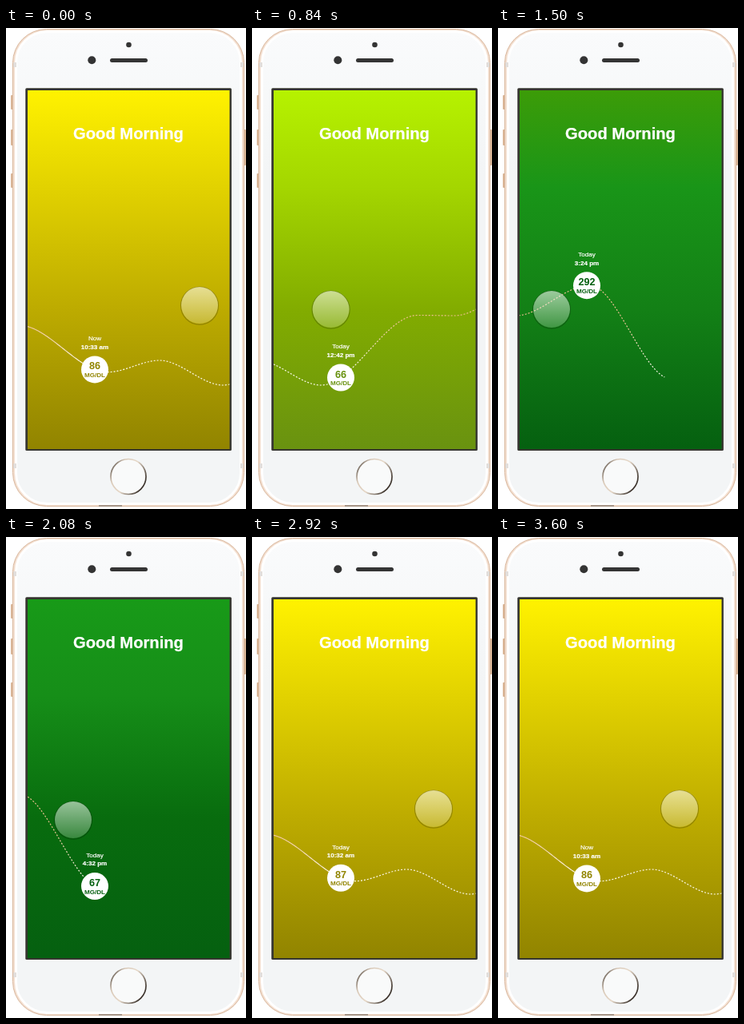
Animation, 300 px wide and 602 px high, one loop 3620 ms. Source, as an HTML page:

```html
<!DOCTYPE html>
<html lang="en">
<head>
<meta charset="utf-8">
<title>Glucose timeline</title>
<style>
  html, body { margin: 0; width: 100%; height: 100%; overflow: hidden; background: #fff; }
  svg { display: block; width: 300px; height: 602px; }
  text { font-family: "Liberation Sans", Arial, sans-serif; text-anchor: middle; }
  .bold { font-weight: bold; }
  .label { font-size: 8.1px; fill: #fff; stroke: #fff; stroke-width: .2; }
  .line { fill: none; stroke: url(#stroke); stroke-width: 1.15; }
</style>
</head>
<body>
<svg viewBox="0 0 300 602">
  <defs>
    <linearGradient id="sky" x1="0" y1="0" x2="0" y2="1">
      <stop offset="0"/><stop offset=".27"/><stop offset=".61"/><stop offset="1"/>
    </linearGradient>
    <linearGradient id="stroke" gradientUnits="userSpaceOnUse" x1="0" y1="365" x2="0" y2="428">
      <stop offset="0" stop-color="#efc090"/><stop offset="1" stop-color="#fffdf2"/>
    </linearGradient>
    <linearGradient id="glass" x1="0" y1="0" x2="0" y2="1">
      <stop offset="0" stop-color="#fff" stop-opacity=".58"/>
      <stop offset="1" stop-color="#fff" stop-opacity=".2"/>
    </linearGradient>
    <linearGradient id="face" x1="0" y1="0" x2="0" y2="1">
      <stop offset="0" stop-color="#fafbfc"/><stop offset=".3" stop-color="#f3f5f6"/>
    </linearGradient>
    <linearGradient id="ring" x1="0" y1="0" x2="1" y2=".6">
      <stop offset="0" stop-color="#2c2622"/><stop offset=".3" stop-color="#d9c9b8"/>
      <stop offset=".6" stop-color="#e6d8c8"/><stop offset="1" stop-color="#3c332c"/>
    </linearGradient>
    <clipPath id="screen"><rect x="27" y="78" width="252.5" height="449"/></clipPath>
  </defs>

  <g fill="#d9b596">
    <rect x="6" y="84" width="3" height="18" rx="1"/>
    <rect x="6" y="127" width="3" height="20" rx="1"/>
    <rect x="6" y="182" width="3" height="18" rx="1"/>
    <rect x="297" y="127" width="3" height="45" rx="1"/>
  </g>
  <rect x="8.5" y="1.5" width="289" height="597" rx="42" fill="#f3dfd0" stroke="#d9b79d"/>
  <rect x="12.5" y="4.5" width="281" height="591" rx="39" fill="url(#face)" stroke="#fff" stroke-width="3"/>
  <path d="M9 46h4M9 548h4M293 46h4M293 548h4" stroke="#e2dedb" stroke-width="6"/>
  <path d="M116 598h29" stroke="#8f8074" stroke-width="1.5"/>
  <g fill="#343434">
    <circle cx="153.5" cy="21" r="3.3"/>
    <circle cx="107.3" cy="40.3" r="5"/>
    <rect x="130" y="38" width="47" height="5" rx="2.5"/>
  </g>
  <circle cx="153" cy="561.5" r="22" fill="#f9fafa" stroke="url(#ring)" stroke-width="1.7"/>
  <rect x="24.3" y="75.2" width="257.6" height="453.8" rx="1.5" fill="#35352f"/>
  <rect x="27" y="78" width="252.5" height="449" fill="url(#sky)"/>

  <text class="bold" x="153" y="139.2" font-size="20.2" fill="#fff" stroke="#fff" stroke-width=".25">Good Morning</text>

  <g clip-path="url(#screen)">
    <g id="track">
      <path class="line" id="past"/>
      <path class="line" id="future" stroke-dasharray="2 2"/>
    </g>
  </g>
  <g id="marker">
    <text class="label" id="day" y="-36.3"></text>
    <text class="label bold" id="clock" y="-25.6"></text>
    <circle r="17" fill="#fff"/>
    <g id="reading" class="bold">
      <text id="value" font-size="12.6"></text>
      <text y="9.6" font-size="8.1">MG/DL</text>
    </g>
  </g>
  <g id="finger">
    <circle cy=".6" r="23.5" fill="none" stroke="#000" stroke-opacity=".22" stroke-width="1.2"/>
    <circle r="23" fill="url(#glass)"/>
  </g>
</svg>
<script>
const LOOP = 3620, NOW_X = 111, END_X = 624, SPAN = END_X - NOW_X;
const PRESS = 100, RELEASE = 840;
const $ = id => document.getElementById(id);

const clamp = (v, lo, hi) => Math.min(hi, Math.max(lo, v));
const progress = (t, a, b) => clamp((t - a) / (b - a), 0, 1);
const ease = (t, a, b) => {
  const u = progress(t, a, b);
  return u * u * (3 - 2 * u);
};

// Accelerates while dragged over `pull`, then coasts to `rest` without a jump in speed.
function fling(t, pull, rest) {
  if (t < RELEASE) return pull * progress(t, PRESS, RELEASE) ** 2;
  const speed = 2 * pull / (RELEASE - PRESS), left = rest - pull;
  return rest - left * Math.exp(-speed * (t - RELEASE) / left);
}

function scroll(t) {
  const overshoot = 1.4 * Math.sin(Math.PI * progress(t, 2840, 3000));
  return Math.min(SPAN, fling(t, 184.5, 620)) - SPAN * ease(t, 2130, 2838) - overshoot;
}

function finger(t) {
  const back = ease(t, 2110, 2540);
  const x = 242 - fling(t, 143, 175) + 17 * ease(t, 1500, 2080)
    + 214 * back - 71 * ease(t, 2540, 2900);
  return [x, 347 + 5 * ease(t, PRESS, RELEASE) + 2 * ease(t, 1500, 2080) - 14 * back];
}

// Turning points of the glucose curve.
const turns = [
  [16, 372], [127, 430.7], [192, 416], [271.3, 447], [392, 359.5],
  [438, 360], [530, 322], [632, 439]
];
function level(x) {
  let y = turns[0][1];
  for (let i = 1; i < turns.length; i++) {
    y += (turns[i][1] - turns[i - 1][1]) * ease(x, turns[i - 1][0], turns[i][0]);
  }
  return y;
}

const themes = [
  [0, "fff200", "e2d200", "bdab00", "918400"],
  [190, "b4f200", "a2d600", "80ac00", "689210"],
  [416, "3c9c08", "199518", "138016", "056010"],
  [SPAN, "189a18", "168e18", "086c0e", "056010"]
].map(([at, ...colors]) => [at, colors.map(c => c.match(/../g).map(h => parseInt(h, 16)))]);

function palette(s) {
  let i = 0;
  while (i < themes.length - 2 && s > themes[i + 1][0]) i++;
  const [a, from] = themes[i], [b, to] = themes[i + 1];
  const u = progress(s, a, b);
  return from.map((c, k) => `rgb(${c.map((v, j) => Math.round(v + (to[k][j] - v) * u))})`);
}

function trace(from, to) {
  let d = "";
  for (let x = from; x <= to; x++) d += `${d ? "L" : "M"}${x} ${level(x).toFixed(2)}`;
  return d;
}

function clockText(minutes) {
  const h = Math.floor(minutes / 60), m = String(minutes % 60).padStart(2, "0");
  return `${(h + 11) % 12 + 1}:${m} ${h < 12 ? "am" : "pm"}`;
}

const move = (el, x, y) => el.setAttribute("transform", `translate(${x.toFixed(2)} ${y.toFixed(2)})`);
const stops = document.querySelectorAll("#sky stop");

$("past").setAttribute("d", trace(0, NOW_X));
$("future").setAttribute("d", trace(NOW_X, END_X));

function draw(t) {
  const s = scroll(t), y = level(NOW_X + s), elapsed = Math.round(s * 0.7);
  const colors = palette(s);
  stops.forEach((stop, i) => stop.setAttribute("stop-color", colors[i]));
  $("reading").setAttribute("fill", colors[3]);
  move($("track"), -s, 0);
  move($("marker"), NOW_X, y);
  move($("finger"), ...finger(t));
  $("day").textContent = elapsed === 0 ? "Now" : "Today";
  $("clock").textContent = clockText(633 + elapsed);
  $("value").textContent = Math.round(65 + (438 - y) * 1.957);
}

const start = performance.now();
function tick() {
  draw((performance.now() - start) % LOOP);
  requestAnimationFrame(tick);
}
tick();
</script>
</body>
</html>
```
